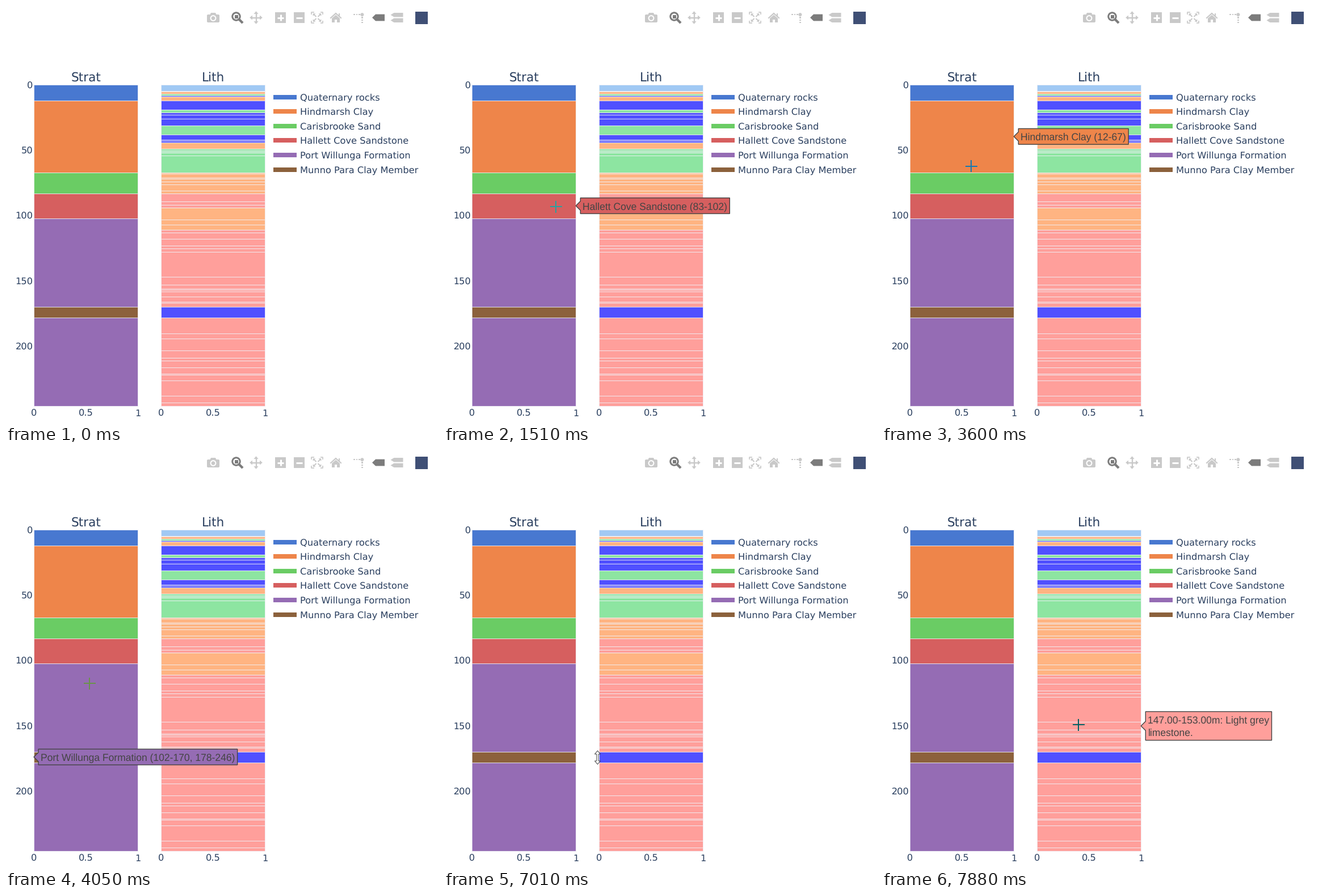
A matplotlib script for the animation above (8 s loop, 761 px wide and 736 px high).

```python
import random

import numpy as np
import matplotlib.pyplot as plt
from matplotlib.animation import FuncAnimation
from matplotlib.colors import to_rgb
from matplotlib.patches import Circle, FancyBboxPatch, Polygon, Rectangle

W, H, DPI = 761, 736, 128
PT = 72 / DPI                      # one pixel in points
INTERVAL, LOOP = 50, 8000
INK, LABEL_INK = "#2a3f5f", "#444444"
ICON, ACTIVE = "#c9c9c9", "#7c7c7c"
TOP, BOTTOM, SCALE = 139.2, 705.6, 2.307
STRAT_X, LITH_X = (49, 232.2), (273, 456.2)

plt.rcParams["text.hinting"] = "none"
fig = plt.figure(figsize=(W / DPI, H / DPI), dpi=DPI, facecolor="white")
ax = fig.add_axes([0, 0, 1, 1])
ax.set(xlim=(0, W), ylim=(H, 0))
ax.axis("off")


def depth_y(depth):
    return min(TOP + depth * SCALE, BOTTOM)


def text(x, y, s, size=16.2, ha="left", color=INK, font="DejaVu Sans", **kw):
    return ax.text(x, y, s, fontsize=size * PT, ha=ha, va="baseline",
                   color=color, family=font, **kw)


def rect(x0, y0, x1, y1, color, **kw):
    return ax.add_patch(Rectangle((x0, y0), x1 - x0, y1 - y0, fc=color, **{"lw": 0, **kw}))


def poly(points, color):
    ax.add_patch(Polygon(points, fc=color, lw=0))


def stroke(xs, ys, color=ICON, width=2):
    ax.plot(xs, ys, color=color, lw=width * PT, solid_capstyle="butt")


def disc(x, y, r, color):
    ax.add_patch(Circle((x, y), r, fc=color, lw=0))


# --- layers ---------------------------------------------------------------
UNITS = [
    ("Quaternary rocks", "#4878d0", [(0, 12)]),
    ("Hindmarsh Clay", "#ee854a", [(12, 67)]),
    ("Carisbrooke Sand", "#6acc64", [(67, 83)]),
    ("Hallett Cove Sandstone", "#d65f5f", [(83, 102)]),
    ("Port Willunga Formation", "#956cb4", [(102, 170), (178, 246)]),
    ("Munno Para Clay Member", "#8c613c", [(170, 178)]),
]
SKY, SAND, MINT, CLAY, LIME = "#a1c9f4", "#ffb482", "#8de5a1", "#5050ff", "#ff9f9b"
# lithology, bottom depth, number of beds it is split into
GROUPS = [
    (SKY, 4.5, 1), (SAND, 7, 2), (MINT, 8, 1), (CLAY, 9, 1), (SAND, 12, 1),
    (CLAY, 19, 1), (MINT, 21, 1), (CLAY, 31, 3), (MINT, 38, 1), (CLAY, 44, 3),
    (SAND, 49, 1), (MINT, 67, 5), (SAND, 83, 7), (LIME, 94, 3), (SAND, 111, 3),
    (LIME, 147, 6), (LIME, 153, 1), (LIME, 170, 7), (CLAY, 178, 1), (LIME, 246, 12),
]

# each layer: x range, y range, colour, hover text, hover tip
layers = []
for name, color, spans in UNITS:
    ranges = ", ".join(f"{a}-{b}" for a, b in spans)
    middle = (depth_y(spans[0][0]) + depth_y(spans[-1][1])) / 2
    tip = (STRAT_X[len(spans) == 1], middle)
    for a, b in spans:
        layers.append((STRAT_X, (depth_y(a), depth_y(b)), color, f"{name} ({ranges})", tip))

rng = random.Random(4)
top = 0
for color, base, beds in GROUPS:
    rock = "Greenish grey clay\nand silt." if color == CLAY else "Light grey\nlimestone."
    splits = sorted(rng.sample(range(int(top) + 1, int(base)), beds - 1))
    for bottom in splits + [base]:
        ys = depth_y(top), depth_y(bottom)
        layers.append((LITH_X, ys, color, f"{top:.2f}-{bottom:.2f}m: {rock}",
                       (LITH_X[1], sum(ys) / 2)))
        top = bottom


def layer_at(x, y):
    for layer in layers:
        (x0, x1), (y0, y1) = layer[:2]
        if x0 <= x <= x1 and y0 <= y < y1:
            return layer
    return None


# --- charts and legend ----------------------------------------------------
for (x0, x1), (y0, y1), color, *_ in layers:
    rect(x0, y0, x1, y1, color, ec="#f0f2f8", lw=0.8 * PT)

for title, (x0, x1) in (("Strat", STRAT_X), ("Lith", LITH_X)):
    mid = (x0 + x1) / 2
    text(mid, 133, title, 21.6, "center")
    for x, tick in ((x0, "0"), (mid, "0.5"), (x1, "1")):
        text(x, 723.5, tick, ha="center")
for depth in range(0, 201, 50):
    text(47.6, depth_y(depth) + 6.2, str(depth), ha="right")

for i, (name, color, _) in enumerate(UNITS):
    y = 160.6 + 25.6 * i
    rect(471, y - 4, 511.7, y + 4, color)
    text(518.5, y + 5.6, name)

# --- toolbar --------------------------------------------------------------
ICON_Y = 20.5
SIDES = ((1, 0), (-1, 0), (0, 1), (0, -1))
CORNERS = ((1, 1), (1, -1), (-1, 1), (-1, -1))


def tag_icon(x, y, half, color):
    poly([(x, y), (x + 6, y - half), (x + 22, y - half), (x + 22, y + half),
          (x + 6, y + half)], color)


# camera
ax.add_patch(FancyBboxPatch((356, 17), 18, 10, boxstyle="round,pad=2", fc=ICON, lw=0))
poly([(359, 16), (361, 12), (369, 12), (371, 16)], ICON)
disc(365, 21.5, 5.4, "white")
disc(365, 21.5, 3.4, ICON)
# zoom
ax.add_patch(Circle((405.5, 18.5), 6.7, fc="white", ec=ACTIVE, lw=3 * PT))
rect(402.5, 15.5, 408.5, 21.5, ACTIVE)
stroke([410, 417], [23, 30], ACTIVE, 4.2)
# pan
for dx, dy in SIDES:
    x, y = 440.5 + 6.5 * dx, ICON_Y + 6.5 * dy
    stroke([440.5, x], [ICON_Y, y], width=2.4)
    poly([(x + 4.8 * dx, y + 4.8 * dy), (x + 4 * dy, y + 4 * dx),
          (x - 4 * dy, y - 4 * dx)], ICON)
# zoom in and out
for x in (483.5, 516):
    rect(x - 9.5, 11, x + 9.5, 30, ICON)
    stroke([x - 5.5, x + 5.5], [ICON_Y, ICON_Y], "white", 3)
stroke([483.5, 483.5], [15, 26], "white", 3)
# autoscale
for corner in CORNERS:
    def at(*points):
        return np.array([548, ICON_Y]) + np.array(points) * corner
    stroke(*at((5.5, 9.7), (9.7, 9.7), (9.7, 5.5)).T, width=1.7)
    stroke(*at((1.5, 1.5), (6, 6)).T)
    poly(at((7.3, 7.3), (7.3, 2.6), (2.6, 7.3)), ICON)
# home
poly([(570.5, 21), (581, 11.5), (591.5, 21), (590, 22.5), (581, 14.5), (572, 22.5)], ICON)
poly([(574, 21.8), (581, 15.8), (588, 21.8), (588, 29), (574, 29)], ICON)
rect(579, 23.5, 583, 29, "white")
rect(585.5, 12.5, 588, 18, ICON)
# spike lines
for i in range(3):
    rect(612.2 + 4.5 * i, 14, 614.8 + 4.5 * i, 16.3, ICON)
    rect(626.2, 19.3 + 4.3 * i, 628.6, 21.7 + 4.3 * i, ICON)
disc(627.4, 15.2, 3, ICON)
# hover modes and badge
tag_icon(645, ICON_Y, 5.9, ACTIVE)
for side in (-1, 1):
    tag_icon(677.5, ICON_Y + 4.8 * side, 3.7, ICON)
rect(721, 10, 742.5, 31.5, "#3f4f75")

# --- pointer path ---------------------------------------------------------
STEP_START, STEP_MS = 400, 110
START = (355, 630)
# first step, last step, destination
MOVES = [
    (0, 7, 270, 463), (7, 8, 220, 380), (8, 10, 197, 354), (10, 15, 171, 226),
    (15, 20, 167, 185), (21, 23, 167, 155), (25, 33, 147, 410), (33, 37, 149, 443),
    (39, 40, 150, 433), (40, 45, 173, 564), (45, 47, 172, 557), (47, 49, 172, 541),
    (55, 60, 270.5, 541), (60, 63, 335, 506), (63, 67, 346, 483),
]


def pointer(step):
    x, y = START
    for first, last, to_x, to_y in MOVES:
        u = min(max((step - first) / (last - first), 0), 1)
        ease = u * u * (3 - 2 * u)
        x += (to_x - x) * ease
        y += (to_y - y) * ease
    return x, y


# --- moving parts ---------------------------------------------------------
NOTCH, PAD, LINE = 8.1, 4.05, 22.8
tag = ax.add_patch(Polygon([(0, 0), (1, 1), (2, 0)], ec=LABEL_INK, lw=1.4 * PT,
                           joinstyle="miter", zorder=5))
tag_lines = [text(0, 0, "", 17.55, color=LABEL_INK, font="Liberation Sans", zorder=6)
             for _ in range(2)]
cross, = ax.plot([], [], lw=2 * PT, solid_capstyle="butt", zorder=7)
resize = ax.add_patch(Polygon([(0, 0), (1, 1), (2, 0)], fc="white", ec="#333333",
                              lw=0.9 * PT, joinstyle="miter", zorder=7))
HALF_ARROW = np.array([(0, -12), (5, -6), (1.6, -6), (1.6, 6), (5, 6), (0, 12)])
ARROW = np.vstack([HALF_ARROW, -HALF_ARROW[1:-1]])


def show_tag(layer):
    tag.set_visible(layer is not None)
    for line in tag_lines:
        line.set_text("")
    if layer is None:
        return
    _, _, color, note, (x, y) = layer
    rows = note.split("\n")
    left = x + NOTCH
    for i, (line, row) in enumerate(zip(tag_lines, rows)):
        line.set_text(row)
        line.set_position((left + PAD, y + (i - (len(rows) - 1) / 2) * LINE + 6.2))
    width = max(line.get_window_extent().width for line in tag_lines[:len(rows)])
    right = left + width + 2 * PAD
    half = 2.2 + LINE / 2 * len(rows) + 0.3
    tag.set_xy([(x, y), (left, y + NOTCH), (left, y + half), (right, y + half),
                (right, y - half), (left, y - half), (left, y - NOTCH)])
    tag.set_facecolor(color)


def update(frame):
    now = frame * INTERVAL + 40
    step = (now - STEP_START) // STEP_MS
    # the hover label trails the pointer by one step
    show_tag(layer_at(*pointer(step - 1)) if step > 0 else None)
    x, y = pointer(step)
    under = layer_at(x, y)
    cross.set_visible(step >= 0 and under is not None)
    resize.set_visible(step >= 0 and under is None)
    resize.set_xy(ARROW + (x, y))
    if under:
        cross.set_data([x - 10.5, x + 10.5, np.nan, x, x],
                       [y, y, np.nan, y - 10.5, y + 10.5])
        cross.set_color([1 - c for c in to_rgb(under[2])])
    return [tag, *tag_lines, cross, resize]


anim = FuncAnimation(fig, update, frames=LOOP // INTERVAL, interval=INTERVAL,
                     repeat=True, repeat_delay=0, blit=False)
plt.show()
```
